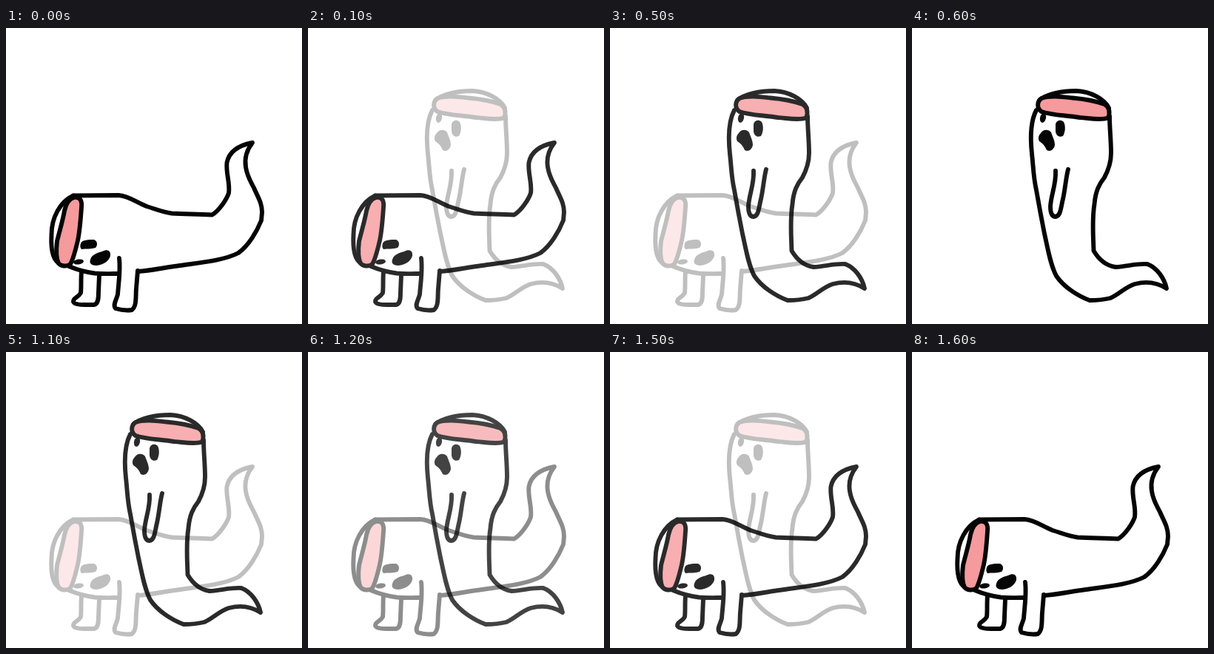
Recreate the animation shown at these times as an HTML page. Size 400 by 400 pixels, loop 1.7 s.

```html
<!DOCTYPE html>
<html lang="en">
<head>
<meta charset="utf-8">
<title>Ghost crossfade</title>
<style>
  html, body { margin: 0; width: 100%; height: 100%; overflow: hidden; background: #fff; }
  svg { display: block; width: 100%; height: 100%; }
  .line { fill: none; stroke: #050505; stroke-width: 5.9; stroke-linecap: round; stroke-linejoin: round; }
  .pink { fill: #f59a9d; }
  .ink { fill: #050505; stroke: none; }
</style>
</head>
<body>
<svg viewBox="0 0 400 400">
  <g id="walker" class="line">
    <!-- back, tail and belly -->
    <path d="M91 226.500L152 226C166 227 175 235 190 241C203 245 212 249 224 250.500C243 251.500 260 251.500 278.500 252.500
      C288 247 298 232 301 223C303 209 297 197 298.500 182C301 169 312 159 333 155
      C326 164 322 176 324 188C326 201 331 208 335 216C340 228 346 236 346 249L345 260
      C339 275 328 294 314 304C295 314 263 317 235 321C212 324 196 328 178 329"/>
    <path d="M85 322C97 327 108 330 120 331.500C132 332.500 142 332 152 332"/>
    <!-- legs -->
    <path d="M102 330C101 340 102 350 101 358C98 364 90 365 91 370C93 375 108 374 119 374C125 373 125 364 125 357L126 334"/>
    <path d="M153 311C155 328 152 345 151 360C149 368 144 374 148 379C155 381 164 382 170 381C177 376 175 363 176 352L178 328"/>
    <!-- cut head -->
    <path d="M91 226.500C73 235 61.500 256 61.500 279C60.500 296 62 315 74 319"/>
    <path class="pink" d="M92 229C100 228 103 233 102 242C101 257 100 273 97 287C94 300 91 312 87 319
      C82 323 74 322 71 318C67 310 68 297 69 288C73 272 77 259 79 247C81 238 85 231 92 229Z"/>
    <path class="ink" d="M101 291C103 286 112 286 119 286C124 288 124 294 121 297C115 299 108 298 102 299C100 297 100 294 101 291Z"/>
    <path class="ink" d="M114 313C116 306 123 304 130 302C137 298 142 301 141 308C139 315 132 320 122 321C116 321 112 318 114 313Z"/>
    <ellipse class="ink" cx="98" cy="316" rx="7" ry="3.500" transform="rotate(-8 98 316)"/>
  </g>
  <g id="stander" class="line">
    <!-- body and tail -->
    <path d="M168 111C159 128 160 151 162 170C164 187 164 202 168 219C172 242 175 258 179 278
      C184 300 187 320 195 335C205 350 224 362 240 368C252 368 260 367 268 365
      C280 360 288 350 301 346C316 342 330 343 344 352
      C341 338 331 324 318 319C303 318 292 322 275 323C261 321 252 312 245.500 301
      C245 281 243 260 246.500 238C248 220 253 211 260 202C267 189 269 180 269 169C269 151 267 136 267 119"/>
    <path d="M194 193C195 211 188 225 187 241C187 250 189 255 194 255C201 254 201 243 204 231C207 218 208 202 211 191"/>
    <!-- cut head -->
    <path d="M172 98C181 89 203 85 222 85C242 86 260 96 266 108"/>
    <path class="pink" d="M175 95C186 91 203 93 217 94.500C234 96 249 99 260 103C267 107 268 114 265 121.500
      C255 125 241 122 227 121C209 118 188 118 175 113C168 108 169 99 175 95Z"/>
    <path class="ink" d="M194 130C195 125 201 123 205 127C208 133 207 141 204 146C199 148 195 146 194 140Z"/>
    <ellipse class="ink" cx="177" cy="121.500" rx="4" ry="6.500" transform="rotate(12 177 121.500)"/>
    <path class="ink" d="M174 142C177 137 184 136 188 141C190 147 193 152 193 158C192 164 187 168 182 165C180 160 177 156 172 153C170 149 171 145 174 142Z"/>
  </g>
</svg>
<script>
  const LOOP = 1700, STEP = 100, FIRST = 100, RETURN = 1100, LAST = 6;
  const opacity = [0, 0.25, 0.45, 0.63, 0.75, 0.85, 1];
  const walker = document.getElementById('walker');
  const stander = document.getElementById('stander');

  const stepsSince = (t, start) =>
    Math.max(0, Math.min(LAST, Math.floor((t - start) / STEP) + 1));

  // The pink fades a little more strongly than the black while blending.
  function fade(figure, alpha) {
    figure.style.opacity = alpha;
    figure.style.fillOpacity = 1;
    figure.querySelector('.pink').style.fillOpacity = 1 - 0.55 * alpha * (1 - alpha);
  }

  function draw() {
    const t = performance.now() % LOOP;
    const step = stepsSince(t, FIRST) - stepsSince(t, RETURN);
    fade(walker, opacity[LAST - step]);
    fade(stander, opacity[step]);
    requestAnimationFrame(draw);
  }
  draw();
</script>
</body>
</html>
```
